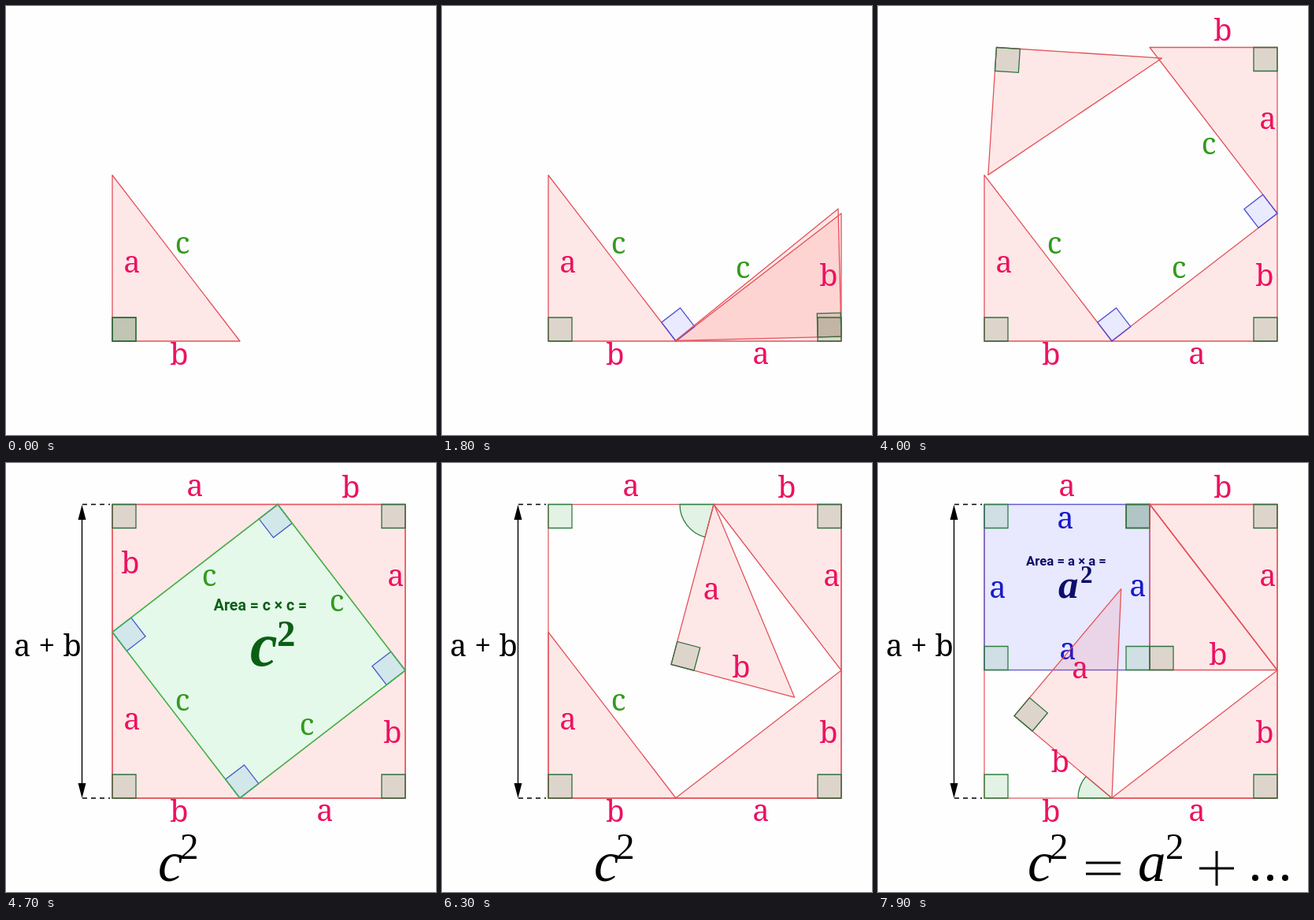
Write an HTML page that moves like this. It is 546 by 544 pixels and loops after 8000 ms.

```html
<!DOCTYPE html>
<html lang="en">
<head>
<meta charset="utf-8">
<title>Pythagorean theorem</title>
<style>
html, body { margin: 0; width: 100%; height: 100%; overflow: hidden; background: #fefefe; }
svg { display: block; width: 546px; height: 544px; }
.tri { fill: rgba(255, 30, 20, .095); stroke: #e5525c; stroke-width: 1.3; stroke-linejoin: round; }
.sq { fill: rgba(0, 90, 20, .13); stroke: #2f6f42; stroke-width: 1.3; }
.pale { fill: rgba(0, 150, 20, .11); stroke: #2f7f42; stroke-width: 1.3; }
.inner { fill: rgba(40, 40, 255, .09); stroke: #5050dc; stroke-width: 1.3; }
.green { fill: rgba(0, 200, 60, .1); stroke: #35c04a; stroke-width: 1.4; }
.blue { fill: rgba(40, 40, 255, .1); stroke: #5a5ad2; stroke-width: 1.3; }
.edge { fill: none; stroke: #e5525c; stroke-width: 1.2; }
.lab { font: 38px "Noto Serif", serif; text-anchor: middle; fill: #ec1261; }
.c { fill: #339a1e; }
.side { fill: #1a1acc; }
.dim { font: 38px "Noto Serif", serif; fill: #000; }
.area { font: bold 19.5px Roboto, sans-serif; text-anchor: middle; }
.math { font: italic 71px "Liberation Serif", serif; }
.bold { font-weight: bold; }
.up { font-style: normal; font-size: 47px; }
.ink { stroke: #000; stroke-width: 1.4; fill: none; }
</style>
</head>
<body>
<svg viewBox="0 0 546 544">
  <defs>
    <path id="sq" class="sq" d="M0 0V-30H30V0Z"/>
    <g id="tri"><path class="tri" d="M0 0V-210.5L162 0Z"/><use href="#sq"/></g>
    <path id="corner" class="inner" d="M0 0L-18.3-23.8L5.5-42.1L23.8-18.3Z"/>
  </defs>

  <rect class="edge" data-on="4030-8000" x="135" y="52.5" width="372" height="372.5"/>
  <path class="pale" data-on="5550-6500" d="M135 52.5h30v30h-30z"/>
  <path class="pale" data-on="7500-8000" d="M135 425v-30h30v30z"/>

  <!-- resting triangles -->
  <use href="#tri" data-on="0-7500" transform="translate(135 425)"/>
  <use href="#tri" data-on="850-8000" transform="translate(507 425) rotate(-90)"/>
  <use href="#tri" data-on="2490-8000" transform="translate(507 52.5) rotate(180)"/>
  <use href="#tri" data-on="4030-5550" transform="translate(135 52.5) rotate(90)"/>

  <!-- copies waiting to leave -->
  <use href="#sq" data-on="0-150" transform="translate(135 425)"/>
  <use href="#sq" data-on="850-1790" transform="translate(507 425) rotate(-90)"/>
  <use href="#sq" data-on="2490-3330" transform="translate(507 52.5) rotate(180)"/>

  <use href="#corner" data-on="900-5550" transform="translate(297 425)"/>
  <use href="#corner" data-on="2500-5550" transform="translate(507 263) rotate(-90)"/>
  <use href="#corner" data-on="4100-5550" transform="translate(345 52.5) rotate(180)"/>
  <use href="#corner" data-on="4100-5550" transform="translate(135 214.5) rotate(90)"/>

  <path class="green" data-on="4350-5550" d="M297 425L507 263L345 52.5L135 214.5Z"/>

  <g data-on="6500-8000">
    <rect class="blue" x="135" y="52.5" width="210" height="210"/>
    <path class="edge" d="M345 262.5H507"/>
    <path class="pale" d="M135 52.5h30v30h-30zM135 262.5v-30h30v30zM345 262.5v-30h-30v30z"/>
    <path class="sq" d="M345 52.5h-30v30h30z"/>
    <path class="sq" d="M345 52.5h-30v30h30z" stroke="none"/>
    <g class="lab">
      <text class="side" x="238" y="83">a</text>
      <text class="side" x="152" y="171">a</text>
      <text class="side" x="330" y="169">a</text>
      <text class="side" x="241" y="249">a</text>
    </g>
    <g fill="#0d0d6b">
      <text class="area" x="239" y="130" style="font-size:16.7px">Area = a × a =</text>
      <text class="math bold" x="229" y="171" style="font-size:51px">a</text>
      <text class="math bold up" x="257" y="152" style="font-size:31px">2</text>
    </g>
  </g>

  <use id="slide" href="#tri"/>
  <path id="arc" class="pale"/>
  <use id="turn" href="#tri"/>

  <!-- labels -->
  <g class="lab">
    <text x="160" y="338" data-on="0-7500">a</text>
    <text x="220" y="455">b</text>
    <text class="c" x="224" y="314" data-on="0-7500">c</text>
    <g data-on="900-8000">
      <text x="405" y="454">a</text>
      <text x="491" y="355">b</text>
      <text class="c" x="382" y="345" data-on="900-5550">c</text>
    </g>
    <g data-on="2500-8000">
      <text x="495" y="156">a</text>
      <text x="438" y="44">b</text>
      <text class="c" x="420" y="188" data-on="2500-5550">c</text>
    </g>
    <g data-on="4100-8000">
      <text x="240" y="42">a</text>
      <text x="158" y="140" data-on="4100-5550">b</text>
      <text class="c" x="258" y="156" data-on="4100-5550">c</text>
    </g>
    <text id="turnA">a</text>
    <text id="turnB">b</text>
  </g>

  <g data-on="4200-8000">
    <path class="ink" d="M96.5 60V418"/>
    <path class="ink" stroke-dasharray="6 5" d="M97 52.5H132M97 425H132"/>
    <path d="M96.5 53l5 19h-10zM96.5 425l5-19h-10z"/>
    <text class="dim" x="10" y="245">a + b</text>
  </g>

  <g data-on="4350-5550" fill="#0b5f14">
    <text class="area" x="323" y="187">Area = c × c =</text>
    <text class="math bold" x="310" y="257" style="font-size:78px">c</text>
    <text class="math bold up" x="344" y="232">2</text>
  </g>

  <!-- equation -->
  <g id="eq" data-on="4450-8000">
    <text class="math" x="190" y="530">c</text>
    <text class="math up" x="218" y="502">2</text>
    <g data-on="6650-8000">
      <path class="ink" style="stroke-width:3" d="M264 507H308M264 521H308M408 514H452M430 492V536"/>
      <text class="math" x="330" y="530">a</text>
      <text class="math up" x="365" y="502">2</text>
      <circle cx="479" cy="526" r="4"/><circle cx="498" cy="526" r="4"/><circle cx="517" cy="526" r="4"/>
    </g>
  </g>
</svg>
<script>
const LOOP = 8000;
const $ = id => document.getElementById(id);
const timed = [...document.querySelectorAll('[data-on]')].map(el => {
  const [from, to] = el.dataset.on.split('-').map(Number);
  return { el, from, to };
});

// Right-angle corner travels along one side of the square while the copy turns 90°.
const slides = [
  { from: 150, to: 850, x: [135, 507], y: [425, 425], angle: 0 },
  { from: 1790, to: 2490, x: [507, 507], y: [425, 52.5], angle: -90 },
  { from: 3330, to: 4030, x: [507, 135], y: [52.5, 52.5], angle: -180 }
];

// Quarter turns about one vertex; label places are relative to the pivot.
const turns = [
  { from: 5550, to: 6450, px: 345, py: 52.5, x: 135, y: 52.5, start: 90, dir: -1, a: [-105, 25], b: [-191, 87] },
  { from: 7500, to: 8400, px: 297, py: 425, x: 135, y: 425, start: 0, dir: 1, a: [-137, -100], b: [-80, 7] }
];

const show = (el, on) => { el.style.display = on ? '' : 'none'; };
const mix = ([p, q], f) => p + (q - p) * f;

function drawSlide(t) {
  const s = slides.find(s => t >= s.from && t < s.to);
  show($('slide'), s);
  if (!s) return;
  const f = (t - s.from) / (s.to - s.from);
  $('slide').setAttribute('transform',
    `translate(${mix(s.x, f)} ${mix(s.y, f)}) rotate(${s.angle - 90 * f})`);
}

function placeLabel(el, turn, [x, y], rad) {
  const cos = Math.cos(rad), sin = Math.sin(rad);
  el.setAttribute('x', turn.px + x * cos - y * sin);
  el.setAttribute('y', turn.py + x * sin + y * cos + 13);
}

function drawTurn(t) {
  const turn = turns.findLast(s => t >= s.from);
  const moving = turn && t < turn.to;
  show($('turn'), turn);
  show($('arc'), moving);
  show($('turnA'), moving);
  show($('turnB'), turn);
  show($('rest'), t >= turns[1].from);
  if (!turn) return;
  const f = Math.min(1, (t - turn.from) / (turn.to - turn.from));
  const deg = turn.dir * 90 * f, rad = deg * Math.PI / 180;
  const { px, py } = turn, r = 43;
  $('turn').setAttribute('transform',
    `rotate(${deg} ${px} ${py}) translate(${turn.x} ${turn.y}) rotate(${turn.start})`);
  $('arc').setAttribute('d', `M${px} ${py}h${-r}A${r} ${r} 0 0 ${turn.dir > 0 ? 1 : 0} ` +
    `${px - r * Math.cos(rad)} ${py - r * Math.sin(rad)}Z`);
  placeLabel($('turnA'), turn, turn.a, rad);
  placeLabel($('turnB'), turn, turn.b, rad);
}

// The first turned triangle stays put while the second one moves.
const rest = document.createElementNS('http://www.w3.org/2000/svg', 'g');
rest.id = 'rest';
rest.innerHTML = '<use href="#tri" transform="translate(345 262.5)"/><text class="lab" x="432" y="256">b</text>';
$('slide').before(rest);

const begin = performance.now();
function frame() {
  const t = (performance.now() - begin) % LOOP;
  for (const { el, from, to } of timed) show(el, t >= from && t < to);
  drawSlide(t);
  drawTurn(t);
  $('eq').setAttribute('transform', `translate(${t < 6650 ? 3 : 0} 0)`);
  requestAnimationFrame(frame);
}
frame();
</script>
</body>
</html>
```
